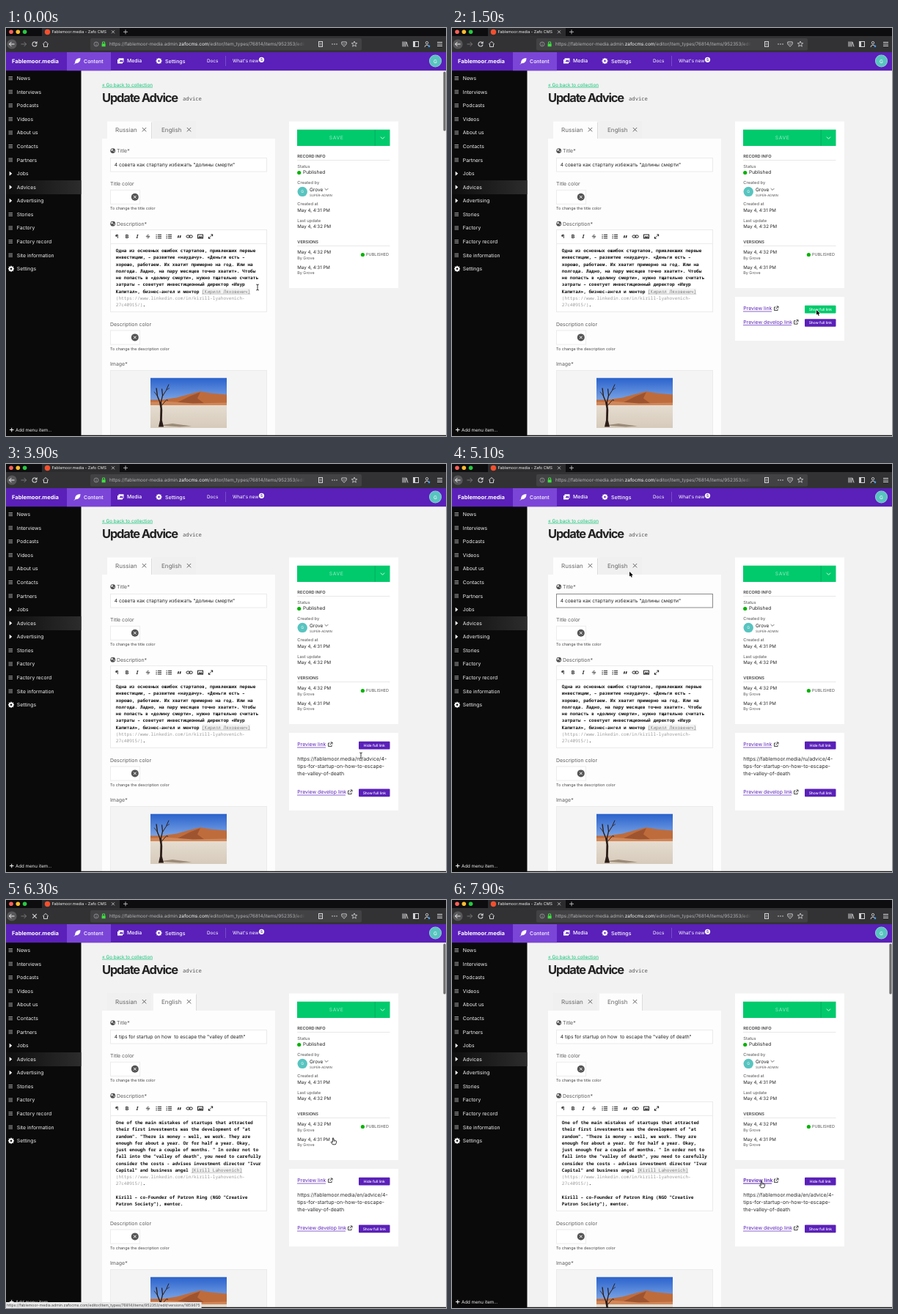
Write an HTML page with a canvas that moves like this. It is 600 px wide and 557 px high and loops after 8000 ms.

```html
<!DOCTYPE html>
<html lang="en">
<head>
<meta charset="utf-8">
<title>Update Advice</title>
<style>
html, body { margin: 0; width: 100%; height: 100%; overflow: hidden; background: #000; }
canvas { display: block; width: 600px; height: 557px; }
</style>
</head>
<body>
<canvas id="stage"></canvas>
<script>
const W = 600, H = 557, LOOP = 8000;
const canvas = document.getElementById('stage');
const dpr = window.devicePixelRatio || 1;
canvas.width = W * dpr;
canvas.height = H * dpr;
const ctx = canvas.getContext('2d');

const SANS = 'Inter, "Open Sans", sans-serif';
const MONO = '"Noto Sans Mono", "DejaVu Sans Mono", monospace';
const PURPLE = '#5a20b9', GREEN = '#00ca6c', TEAL = '#58c4bf', DARK = '#222', GREY = '#5c5c5c', PAGE = '#f2f2f2';

const SITE = 'fablemoor';
const ADMIN = ['https://' + SITE + '-media.admin.', 'zafocms.com', '/editor/item_types/76814/items/952353/edit'];
const SLUG = '4-tips-for-startup-on-how-to-escape-the-valley-of-death';

const BODY = {
  ru: `Одна из основных ошибок стартапов, привлекших первые
инвестиции, – развитие «наудачу». «Деньги есть –
хорошо, работаем. Их хватит примерно на год. Или на
полгода. Ладно, на пару месяцев точно хватит». Чтобы
не попасть в «долину смерти», нужно тщательно считать
затраты – советует инвестиционный директор «Ивур
Капитал», бизнес-ангел и ментор [Кирилл Ляховенич]
(https://www.linkedin.com/in/kirill-lyahovenich-
27c40915/).`,
  en: `One of the main mistakes of startups that attracted
their first investments was the development of "at
random". "There is money – well, we work. They are
enough for about a year. Or for half a year. Okay,
just enough for a couple of months. " In order not to
fall into the "valley of death", you need to carefully
consider the costs - advises investment director "Ivur
Capital" and business angel [Kirill Lahovenich]
(https://www.linkedin.com/in/kirill-lyahovenich-
27c40915/).

Kirill – co-Founder of Patron Ring (NGO "Creative
Patron Society"), mentor.`
};
const TITLE = {
  ru: '4 совета как стартапу избежать "долины смерти"',
  en: '4 tips for startup on how  to escape the "valley of death"'
};

// Pointer path: time, x, y
const PATH = [
  [0, 343, 354], [250, 343, 354], [900, 470, 392], [1300, 497, 385], [1800, 497, 385],
  [2250, 425, 384], [2550, 425, 384], [2800, 460, 384], [3300, 494, 384], [3600, 494, 384],
  [3900, 484, 398], [4100, 484, 398], [4550, 425, 330], [4700, 380, 290], [5000, 252, 182],
  [5100, 242, 147], [5400, 230, 139], [5750, 230, 139], [6150, 446, 325], [6400, 446, 325],
  [6900, 462, 395], [7600, 455, 400], [7750, 449, 395], [7880, 422, 384], [8000, 422, 384]
];
const T_PANEL = 500, T_OPEN = 3500, T_ENGLISH = 5550;

function pointer(t) {
  t = Math.max(0, t);
  let i = 1;
  while (i < PATH.length - 1 && PATH[i][0] < t) i++;
  const [t0, x0, y0] = PATH[i - 1], [t1, x1, y1] = PATH[i];
  const k = (t - t0) / (t1 - t0), e = k * k * (3 - 2 * k);
  return [x0 + (x1 - x0) * e, y0 + (y1 - y0) * e];
}
const inside = ([x, y], [l, t, r, b]) => x >= l && x <= r && y >= t && y <= b;
const AREA = {
  link: [397, 377, 444, 389],
  versions: [397, 302, 450, 340],
  button: [481, 378, 523, 390],
  title: [142, 177, 356, 196],
  fullLink: [397, 394, 523, 430]
};

function rect(x, y, w, h, fill) {
  ctx.fillStyle = fill;
  ctx.fillRect(x, y, w, h);
}
function frame(x, y, w, h, stroke, fill) {
  if (fill) rect(x, y, w, h, fill);
  ctx.strokeStyle = stroke;
  ctx.lineWidth = 1;
  ctx.strokeRect(x + .5, y + .5, w - 1, h - 1);
}
function round(x, y, w, h, r, fill) {
  ctx.beginPath();
  ctx.roundRect(x, y, w, h, r);
  ctx.fillStyle = fill;
  ctx.fill();
}
function dot(x, y, r, fill) {
  ctx.beginPath();
  ctx.arc(x, y, r, 0, Math.PI * 2);
  ctx.fillStyle = fill;
  ctx.fill();
}
function arc(x, y, r, from, to, color, w) {
  ctx.beginPath();
  ctx.arc(x, y, r, from, to);
  ctx.strokeStyle = color;
  ctx.lineWidth = w;
  ctx.stroke();
}
function trace(p) {
  ctx.beginPath();
  for (let i = 0; i < p.length; i += 2) ctx.lineTo(p[i], p[i + 1]);
}
function line(p, color, w = 1) {
  trace(p);
  ctx.strokeStyle = color;
  ctx.lineWidth = w;
  ctx.stroke();
}
function poly(p, fill) {
  trace(p);
  ctx.fillStyle = fill;
  ctx.fill();
}
function cross(x, y, r, color, w = .9) {
  line([x - r, y - r, x + r, y + r], color, w);
  line([x + r, y - r, x - r, y + r], color, w);
}
function chevron(x, y, r, color) {
  line([x - r, y - r / 2, x, y + r / 2, x + r, y - r / 2], color, .9);
}
// Text with its capitals centred on y; returns the advance width
function text(s, x, y, size, color, weight = 400, family = SANS, spacing = 0, align = 'left') {
  ctx.font = `${weight} ${size}px ${family}`;
  ctx.letterSpacing = spacing + 'px';
  ctx.textAlign = align;
  ctx.fillStyle = color;
  ctx.fillText(s, x, y + size * .36);
  return ctx.measureText(s).width;
}
const centred = (s, x, y, size, color, weight, spacing) => text(s, x, y, size, color, weight, SANS, spacing, 'center');

function arrow(x, y, dir, color) {
  line([x - 3.5, y, x + 3.5, y], color, 1);
  line([x + dir * .6, y - 3, x + dir * 3.6, y, x + dir * .6, y + 3], color, 1);
}

function browserBar(loading) {
  const icon = '#d4d4d6';
  rect(0, 0, W, 11, '#0d0d0f');
  rect(0, 11, W, 22, '#323234');
  dot(7, 5.2, 2.8, '#ff5f57');
  dot(16.3, 5.2, 2.8, '#febc2e');
  dot(25.6, 5.2, 2.8, '#28c840');
  rect(49, 0, 106, 11, '#2c2c2e');
  dot(56.5, 5.5, 3.7, '#f4502f');
  text('Fablemoor.media - Zafo CMS', 62.5, 5.4, 5.4, '#f4f4f4');
  cross(146, 5.3, 2, icon, .8);
  line([160, 5.3, 166, 5.3], icon, .8);
  line([163, 2.3, 163, 8.3], icon, .8);

  dot(8, 22, 6.6, '#58585b');
  arrow(8, 22, -1, '#f2f2f2');
  arrow(24, 22, 1, '#77777a');
  if (loading) cross(39, 22, 2.8, icon, 1.1);
  else {
    arc(39, 22, 3, .2, Math.PI * 1.75, icon, 1.1);
    poly([42.6, 18, 42.6, 21.6, 39, 21.6], icon);
  }
  line([50, 22.3, 54, 18.5, 58, 22.3], icon, 1);
  line([51.5, 22, 51.5, 25.6, 56.5, 25.6, 56.5, 22], icon, 1);

  round(115, 14, 370, 16.5, 2, '#424245');
  arc(123, 22, 3, 0, 7, '#9a9a9d', .8);
  line([123, 21.6, 123, 24], '#9a9a9d', .8);
  dot(123, 20.3, .5, '#9a9a9d');
  line([131.6, 21.5, 131.6, 19, 134.6, 19, 134.6, 21.5], '#3fe03f', 1);
  rect(130.6, 21.3, 5, 4, '#3fe03f');
  let x = 141;
  ctx.save();
  ctx.beginPath();
  ctx.rect(115, 12, 292, 20);
  ctx.clip();
  ADMIN.forEach((s, i) => { x += text(s, x, 22, 6.35, i === 1 ? '#fff' : '#b4b4b7'); });
  ctx.restore();
  const fade = ctx.createLinearGradient(394, 0, 408, 0);
  fade.addColorStop(0, 'rgba(66,66,69,0)');
  fade.addColorStop(1, '#424245');
  rect(394, 16, 14, 12, fade);

  frame(426, 18, 6, 8, icon);
  line([427.5, 21, 430.5, 21], icon, .7);
  line([427.5, 23, 430.5, 23], icon, .7);
  for (const d of [445, 448, 451]) dot(d, 22, .8, icon);
  line([457.8, 19, 464.2, 19, 464.2, 22, 461, 25.4, 457.8, 22, 457.8, 19], icon, .9);
  line([459.5, 21, 461, 22.5, 462.5, 21], icon, .8);
  const star = [];
  for (let i = 0; i <= 10; i++) {
    const a = i * Math.PI / 5 - Math.PI / 2, r = i % 2 ? 1.7 : 4;
    star.push(475 + r * Math.cos(a), 22 + r * Math.sin(a));
  }
  line(star, icon, .8);
  for (const d of [541, 543, 545]) line([d, 18.5, d, 25.5], icon, 1);
  line([546, 19, 548, 25.5], icon, 1);
  frame(555, 18, 8, 8, icon);
  rect(555, 18, 3, 8, icon);
  arc(574, 20.2, 1.7, 0, 7, icon, .9);
  arc(574, 26.2, 3, Math.PI, 0, icon, .9);
  dot(577, 24.8, 1.3, '#3aa0ff');
  for (const y of [19.5, 22, 24.5]) line([588, y, 595, y], icon, 1);
}

function nav() {
  rect(0, 32.5, W, 25.7, PURPLE);
  rect(83, 32.5, 60, 25.7, '#7b45d8');
  text('Fablemoor.media', 8, 45, 7.55, '#fff', 700);
  ctx.beginPath();
  ctx.moveTo(94, 48);
  ctx.quadraticCurveTo(94, 41, 101.5, 41);
  ctx.quadraticCurveTo(101.5, 48.5, 95, 48.3);
  ctx.fillStyle = '#fff';
  ctx.fill();
  line([93, 49.5, 98, 44.5], '#fff', .8);
  text('Content', 106, 45, 7, '#fff', 500);
  rect(152, 43, 7, 5.5, '#fff');
  rect(153.5, 41.3, 7, 5.5, '#fff');
  poly([154.5, 46, 156.7, 43.3, 158, 44.7, 159, 43.8, 160, 46], PURPLE);
  text('Media', 165, 45, 6.9, '#fff', 500);
  gear(208.5, 45, '#fff', PURPLE);
  text('Settings', 217, 45, 7, '#fff', 500);
  text('Docs', 274, 45, 6.3, '#fff');
  line([299.5, 38, 299.5, 52], 'rgba(255,255,255,.2)');
  text("What's new", 309, 45, 6.4, '#fff');
  dot(348.5, 43.3, 3.6, '#fff');
  centred('5', 348.5, 43.4, 5, PURPLE, 700);
  dot(585.5, 45, 8.5, '#a5d8e2');
  dot(585.5, 45, 7.9, TEAL);
  centred('G', 585.5, 45.2, 6.5, '#fff');
}

function gear(x, y, color, hole) {
  for (let i = 0; i < 4; i++) {
    const a = i * Math.PI / 4, c = 4 * Math.cos(a), s = 4 * Math.sin(a);
    line([x - c, y - s, x + c, y + s], color, 1.7);
  }
  dot(x, y, 3, color);
  dot(x, y, 1.2, hole);
}

function sidebar() {
  rect(0, 58, 102.5, 499, '#0a0a0a');
  const glow = ctx.createLinearGradient(0, 0, 102, 0);
  glow.addColorStop(0, '#0e0e0e');
  glow.addColorStop(1, '#2c2c2c');
  rect(0, 208, 102.5, 19, glow);
  const items = ['News', 'Interviews', 'Podcasts', 'Videos', 'About us', 'Contacts', 'Partners', 'Jobs', 'Advices',
    'Advertising', 'Stories', 'Factory', 'Factory record', 'Site information', 'Settings'];
  items.forEach((s, i) => {
    const y = 68.6 + i * 18.58;
    if (i === 14) gear(7, y, '#fff', '#0a0a0a');
    else if (i >= 7 && i <= 9) poly([4.7, y - 3, 8.2, y, 4.7, y + 3], '#fff');
    else for (const d of [-2, 0, 2]) line([3.5, y + d, 9, y + d], '#c4c4c4', .8);
    text(s, 14.8, y, 6.85, '#f3f3f3');
  });
  line([5, 548.6, 10.5, 548.6], '#fff', 1);
  line([7.75, 545.9, 7.75, 551.3], '#fff', 1);
  text('Add menu item...', 13, 548.6, 6.2, '#eee');
}

function globe(x, y) {
  dot(x, y, 3.4, '#4d4d4d');
  poly([x - 2.6, y - 1.6, x - .4, y - 2.8, x + .4, y - .8, x - 1, y + .6, x - 2.2, y], '#ddd');
  poly([x + .6, y + .4, x + 2.6, y - .4, x + 1.8, y + 2.2], '#ddd');
}
function label(s, y, hasGlobe) {
  if (hasGlobe) globe(145.7, y);
  text(s, hasGlobe ? 151 : 142, y, 6.95, GREY);
}
function colorField(name, y) {
  label(name[0].toUpperCase() + name.slice(1) + ' color', y);
  frame(142, y + 8.5, 41, 20, '#ececec', '#fff');
  dot(175.8, y + 18.4, 5, '#555');
  cross(175.8, y + 18.4, 1.8, '#fff', 1);
  text(`To change the ${name} color`, 142, y + 34, 5.4, '#444');
}

function toolbar(y) {
  const c = '#222';
  centred('¶', 151, y, 7, c, 700);
  centred('B', 165, y, 7, c, 700);
  text('I', 179, y, 7, c, 'italic 600', '"Noto Serif", serif', 0, 'center');
  centred('S', 193.5, y, 6.6, c);
  line([190.8, y, 196.2, y], c, .7);
  for (const x of [204.5, 218.5]) for (const d of [-2.3, 0, 2.3]) {
    line([x, y + d, x + 1.2, y + d], c, 1.1);
    line([x + 2.4, y + d, x + 7.5, y + d], c, 1);
  }
  centred('“', 236, y + 2.2, 11, c, 800);
  ctx.lineWidth = 1;
  ctx.strokeStyle = c;
  for (const x of [248.3, 252]) {
    ctx.beginPath();
    ctx.ellipse(x, y, 2.4, 1.7, 0, 0, 7);
    ctx.stroke();
  }
  frame(261, y - 3, 8, 6, c);
  poly([262, y + 2, 264, y - .5, 265.5, y + .6, 266.7, y - .6, 268, y + 2], c);
  line([279.4, y - 2.6, 281.6, y - 2.6, 281.6, y - .4], c, 1.1);
  line([276.4, y + .4, 276.4, y + 2.6, 278.6, y + 2.6], c, 1.1);
  line([276.6, y + 2.4, 281.4, y - 2.4], c, .8);
}

function editor(lang, bottom) {
  frame(142, 275, 214, bottom - 275, '#ebebeb', '#fff');
  line([142, 294.5, 356, 294.5], '#ebebeb');
  toolbar(284.6);
  BODY[lang].split('\n').forEach((row, i) => {
    const y = 304 + i * 9.25;
    let x = 149.8;
    row.split(/(\[.*?\]|\(https\S*|\d+\w+\/\))/).forEach((s, k) => {
      if (!s) return;
      const link = s[0] === '[', color = link ? '#777' : k % 2 ? '#9c9c9c' : '#111';
      const w = s.length * 3.67;
      if (link) {
        rect(x, y - 4, w, 8.5, '#f3f3f3');
        line([x, y + 3.6, x + w, y + 3.6], '#aaa', .6);
      }
      x += text(s, x, y, 6.12, color, k % 2 ? 400 : 600, MONO);
    });
  });
}

function photo(x, y) {
  ctx.save();
  ctx.beginPath();
  ctx.rect(x, y, 104, 68.5);
  ctx.clip();
  ctx.translate(x, y);
  const sky = ctx.createLinearGradient(0, 0, 0, 30);
  sky.addColorStop(0, '#2a62cc');
  sky.addColorStop(1, '#78a2e4');
  rect(0, 0, 104, 40, sky);
  poly([0, 30, 16, 30, 36, 27, 54, 22, 68, 18.5, 82, 21, 104, 23, 104, 42, 0, 42], '#bf6c3c');
  poly([34, 35, 54, 25, 68, 19.5, 64, 28, 76, 37], '#9f5430');
  poly([0, 33, 26, 32.5, 58, 35, 104, 34, 104, 42, 0, 42], '#d0875a');
  const sand = ctx.createLinearGradient(0, 37, 0, 68);
  sand.addColorStop(0, '#e6ddd0');
  sand.addColorStop(1, '#d6cabb');
  rect(0, 37.5, 104, 31, sand);
  poly([12, 65, 30, 62.5, 56, 66, 40, 67], '#9b8b79');
  const bark = '#2b1d18';
  poly([11, 67, 13, 58, 13.4, 42, 12, 33, 15, 33, 16.2, 44, 15.8, 58, 18, 67], bark);
  line([13.5, 35, 9.5, 25, 8, 14], bark, 1.4);
  line([9.5, 25, 5, 19], bark, .8);
  line([14, 35, 16.5, 24, 15.5, 15], bark, 1.3);
  line([16.5, 25, 21.5, 17, 25, 9], bark, 1);
  line([21.5, 17, 26, 14], bark, .7);
  line([15, 38, 22, 30, 24, 31], bark, .9);
  ctx.restore();
}

function tab(name, x, w, active) {
  if (active) {
    rect(x + w, 129, 1, 22, '#dcdcdc');
    rect(x, 127.5, w, 24, '#fdfdfd');
  } else rect(x, 127.5, w, 23.5, '#f0f0f0');
  text(name, x + 11, 139, 8.1, '#666');
  cross(x + w - 9.5, 138.7, 2.7, '#555', .9);
}

function form(lang, titleHot) {
  const drop = lang === 'en' ? 37 : 0;
  text('« Go back to collection', 131, 77.5, 6.37, '#10c274');
  line([131, 81, 200, 81], '#10c274', .7);
  text('Update Advice', 131, 95.3, 16.5, DARK, 700, SANS, -1.2);
  text('advice', 241, 96.2, 7.2, '#555', 400, MONO);
  rect(131, 151, 236, 405, '#fdfdfd');
  tab('Russian', 138, 60, lang === 'ru');
  tab('English', 201, 58, lang === 'en');

  label('Title*', 167.6, true);
  frame(142, 177, 214, 19.5, titleHot ? '#8a8a8a' : '#ebebeb', '#fff');
  text(TITLE[lang], 147.8, 186.4, 6.7, DARK);
  colorField('title', 212.3);
  label('Description*', 267.2, true);
  editor(lang, 388 + drop);
  colorField('description', 404 + drop);
  label('Image*', 458.3 + drop, false);
  frame(142, 467 + drop, 214, 120, '#ebebeb', '#f4f4f4');
  photo(197, 477.5 + drop);
}

function recordPanel() {
  rect(386, 127.5, 149, 227.5, '#fff');
  rect(397, 138.7, 126.5, 22.3, GREEN);
  line([503.2, 139, 503.2, 161], '#00a95a', .8);
  centred('SAVE', 450.5, 150, 6.7, 'rgba(255,255,255,.5)', 500, .5);
  chevron(513.5, 150, 2.7, '#e2f9ee');

  const heading = (s, y) => {
    text(s, 397.3, y, 5.65, '#444', 600);
    line([397, y + 6, 523.5, y + 6], '#e2e2e2', .8);
  };
  const small = (s, y) => text(s, 397.3, y, 5.75, '#555');
  const value = (s, y) => text(s, 397.3, y, 6.15, DARK);
  heading('RECORD INFO', 174.5);
  small('Status', 188.6);
  dot(399.7, 197.5, 2.6, '#00b300');
  text('Published', 405, 197, 6.5, DARK);
  small('Created by', 211.2);
  dot(404.2, 223.4, 6.7, TEAL);
  centred('G', 404.2, 223.5, 5.2, '#fff');
  text('Grove', 414, 220.2, 6.5, DARK);
  chevron(437, 220.2, 2.4, '#666');
  text('SUPER-ADMIN', 414, 228, 4.4, '#555');
  small('Created at', 240);
  value('May 4, 4:31 PM', 248.3);
  small('Last update', 263);
  value('May 4, 4:32 PM', 271.2);
  heading('VERSIONS', 291.5);
  value('May 4, 4:32 PM', 306);
  text('By Grove', 397.3, 313.7, 5.4, '#555');
  dot(486.4, 309.5, 2.6, '#00b300');
  text('PUBLISHED', 491, 309.5, 5.55, '#555');
  value('May 4, 4:31 PM', 326.8);
  text('By Grove', 397.3, 334.4, 5.4, '#555');
}

function previewLink(s, y, width, hot) {
  text(s, 397.3, y, 6.9, PURPLE, hot ? 600 : 400);
  line([397, y + 4, 397 + width, y + 4], PURPLE, hot ? 1 : .7);
  const x = 400.5 + width;
  line([x + 2, y - 2, x, y - 2, x, y + 2.6, x + 4.6, y + 2.6, x + 4.6, y + .5], '#333', .9);
  line([x + 2, y + .5, x + 5.4, y - 2.9], '#333', .9);
  line([x + 3, y - 3, x + 5.5, y - 3, x + 5.5, y - .5], '#333', .9);
}
function pill(s, y, hot) {
  round(481, y - 5.2, 42.5, 10.6, 1, hot ? GREEN : PURPLE);
  centred(s, 502.3, y, 4.95, '#fff', 500);
}

function previewPanel(lang, open, linkHot, buttonHot) {
  const y = open ? 448 : 401.6;
  rect(386, 367, 149, open ? 106 : 60, '#fff');
  previewLink('Preview link', 383, 39, linkHot);
  pill(open ? 'Hide full link' : 'Show full link', 384, buttonHot);
  previewLink('Preview develop link', y, 66, false);
  pill('Show full link', y + .8, false);
  if (open) {
    const rows = [`https://${SITE}.media/${lang}/advice/4-`, SLUG.slice(2, 36), SLUG.slice(36)];
    rows.forEach((s, i) => text(s, 397.3, 402 + i * 10.4, 6.95, '#2c2c2c'));
  }
}

function statusBar(s) {
  ctx.font = `400 5.2px ${SANS}`;
  ctx.letterSpacing = '0px';
  rect(0, 549, ctx.measureText(s).width + 3, 8, '#e9e9e9');
  text(s, 1, 553.2, 5.2, '#444');
}

function cursor(kind, [x, y]) {
  ctx.save();
  ctx.translate(x, y);
  ctx.lineJoin = 'round';
  if (kind === 'text') {
    const bar = [-1.8, -4, 0, -3.4, 1.8, -4];
    for (const [c, w] of [['#fff', 1.8], ['#222', .9]]) {
      line(bar, c, w);
      line([0, -3.4, 0, 3.4], c, w);
      line(bar.map((v, i) => i % 2 ? -v : v), c, w);
    }
  } else if (kind === 'hand') {
    const p = [-.7, 0, .7, 0, .9, 3, 2.2, 3, 3.6, 3.6, 4.6, 4.2, 4.4, 6.6, 3.4, 8.8, -.6, 8.8, -2.8, 5.6, -2.2, 4.8, -.7, 5.8, -.7, 0];
    poly(p, '#fff');
    line(p, '#222', .9);
    line([1, 3, 1, 5], '#222', .5);
    line([2.5, 3.4, 2.5, 5.2], '#222', .5);
  } else {
    const p = [0, 0, 0, 6.6, 1.5, 5.3, 2.6, 7.8, 3.8, 7.3, 2.8, 4.9, 4.8, 4.8, 0, 0];
    line(p, '#fff', 1.3);
    poly(p, '#000');
  }
  ctx.restore();
}

function draw(t) {
  const lang = t < T_ENGLISH ? 'ru' : 'en';
  const panel = t >= T_PANEL, open = t >= T_OPEN;
  const at = pointer(t), before = pointer(t - 150);
  const linkHot = panel && inside(at, AREA.link);
  const titleHot = inside(at, AREA.title) || inside(before, AREA.title);

  ctx.setTransform(dpr, 0, 0, dpr, 0, 0);
  ctx.textRendering = 'geometricPrecision';
  rect(0, 0, W, H, PAGE);
  form(lang, titleHot);
  recordPanel();
  if (panel) previewPanel(lang, open, linkHot, inside(at, AREA.button));
  sidebar();
  rect(102, 555.8, W - 102, 2, '#161616');
  nav();
  browserBar(t >= 5800 && t < 6600);

  ctx.globalAlpha = lang === 'ru' ? Math.min(1, Math.max(0, (1300 - t) / 250)) : 1;
  round(596.4, 59.5, 3.2, lang === 'ru' ? 81 : 69, 1.6, '#6c6c6c');
  ctx.globalAlpha = 1;

  if (panel && inside(before, AREA.link)) statusBar(`https://${SITE}.media/${lang}/advice/${SLUG}`);
  else if (inside(before, AREA.versions)) statusBar(ADMIN.join('') + '/versions/1859675');

  const typing = [AREA.title, [142, 295, 356, lang === 'ru' ? 388 : 425]];
  if (open) typing.push(AREA.fullLink);
  const hand = linkHot || inside(at, AREA.versions);
  cursor(hand ? 'hand' : typing.some(a => inside(at, a)) ? 'text' : 'arrow', at);
}

function tick(now) {
  draw(now % LOOP);
  requestAnimationFrame(tick);
}
requestAnimationFrame(tick);
</script>
</body>
</html>
```
